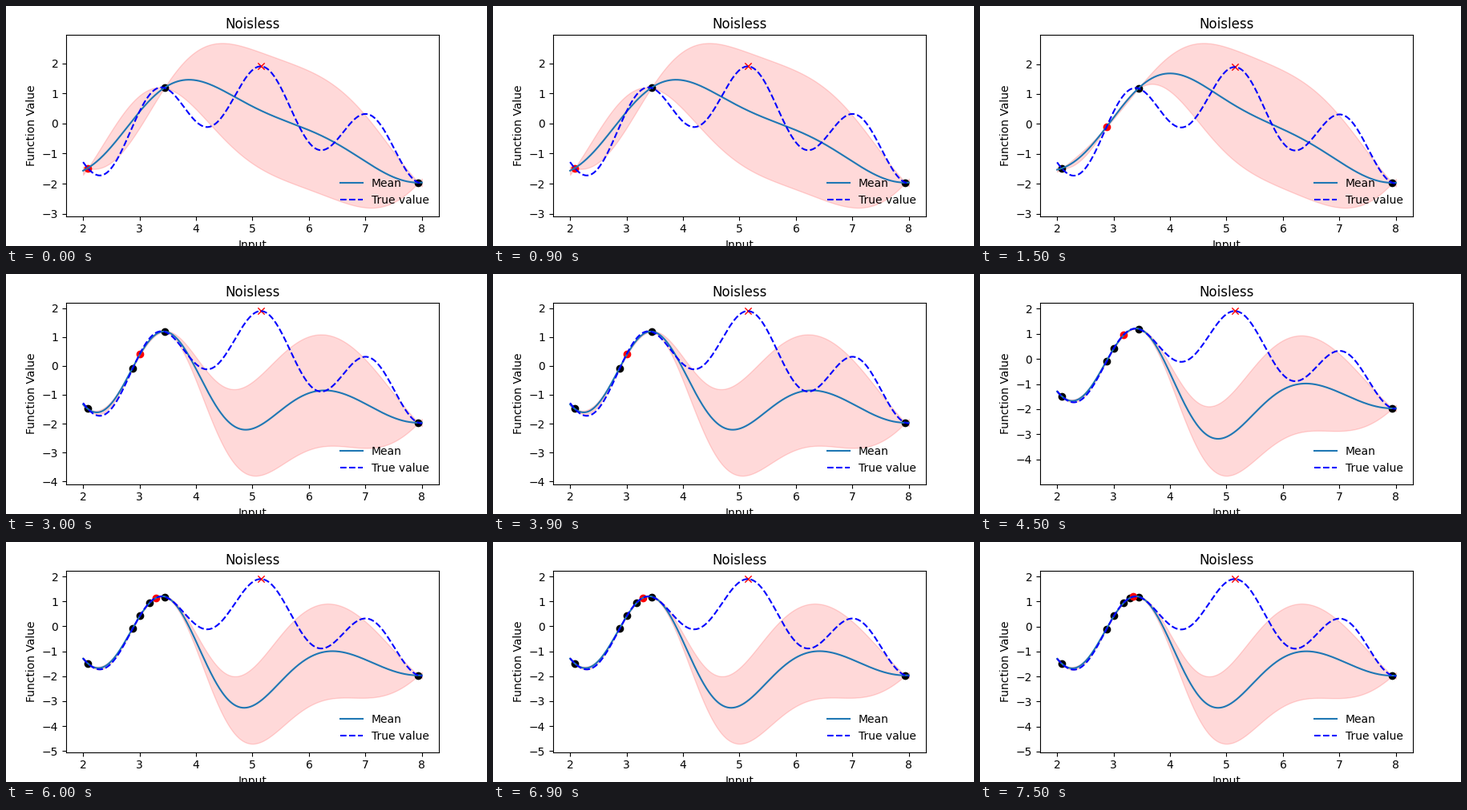
A matplotlib script that plays this animation: 600 by 300 pixels, repeating every 8000 ms.

```python
import numpy as np
import matplotlib.pyplot as plt
from matplotlib.animation import FuncAnimation

STEP_MS = 500
HOLD = 3          # steps each sample stays newest
STEPS = 16
NOISE = 1e-4

START = [3.439, 7.938]
PICKS = [2.083, 2.878, 3.006, 3.177, 3.290, 3.347]
GRID = np.linspace(2, 8, 500)


def truth(x):
    return -np.sin(x) - np.sin(10 * x / 3)


def kernel(a, b):
    return np.exp(-0.5 * (a[:, None] - b[None, :]) ** 2)


def posterior(x, y):
    gram = kernel(x, x) + NOISE * np.eye(len(x))
    cross = kernel(x, GRID)
    weights = np.linalg.solve(gram, cross)
    var = 1 - np.sum(cross * weights, axis=0)
    return y @ weights, np.sqrt(np.maximum(var, 0))


fig, ax = plt.subplots(figsize=(6, 3), dpi=100)
fig.subplots_adjust(left=0.125, right=0.9, bottom=0.125, top=0.88)
peak = GRID[np.argmax(truth(GRID))]


def draw(step):
    count = step // HOLD + 1
    x = np.array(START + PICKS[:count])
    y = truth(x)
    mean, std = posterior(x, y)

    ax.clear()
    ax.fill_between(GRID, mean - 2 * std, mean + 2 * std,
                    color="red", alpha=0.15)
    ax.plot(GRID, mean, label="Mean")
    ax.plot(GRID, truth(GRID), "b--", label="True value")
    ax.scatter(x[:-1], y[:-1], color="black")
    ax.scatter(x[-1:], y[-1:], color="red")
    ax.scatter([peak], [truth(peak)], color="red", marker="x", linewidths=1)
    ax.set_title("Noisless")
    ax.set_xlabel("Input")
    ax.set_ylabel("Function Value")
    ax.legend(loc="lower right", frameon=False)


anim = FuncAnimation(fig, draw, frames=STEPS, init_func=lambda: None,
                     interval=STEP_MS, repeat=True, repeat_delay=0)
plt.show()
```
